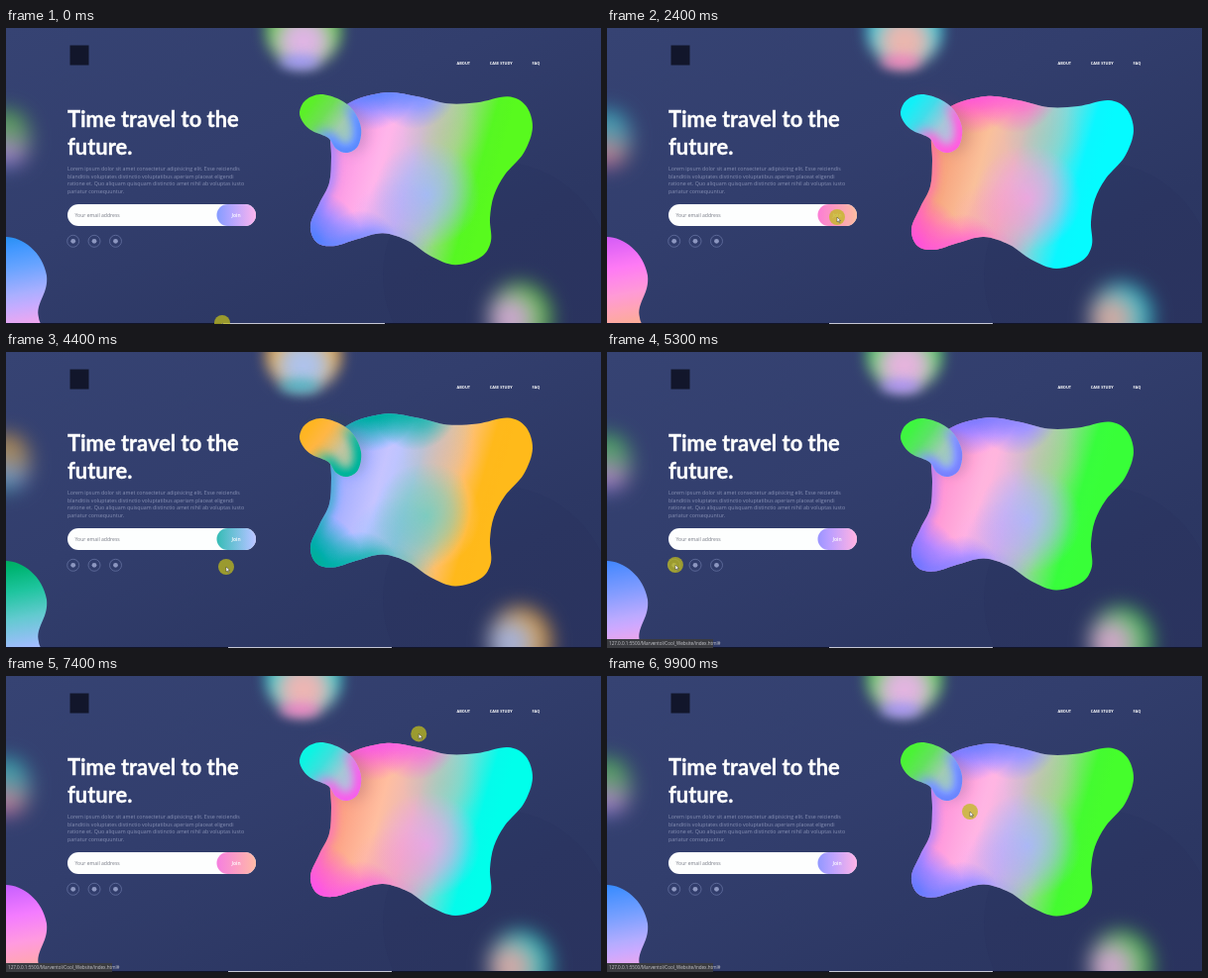
These frames come from a looping animation (600x299 px, 10 s). An HTML page with a canvas:

```html
<!DOCTYPE html>
<html lang="en">
<head>
<meta charset="utf-8">
<title>Time travel to the future</title>
<style>
  html, body { margin: 0; width: 100%; height: 100%; overflow: hidden; background: #303b69; }
  #stage { position: absolute; inset: 0; width: 600px; height: 299px; overflow: hidden;
    background: linear-gradient(155deg, #364373 0%, #323e6d 40%, #2c3763 75%, #2b355f 100%); }
  canvas, svg { position: absolute; left: 0; top: 0; }
  text { font-family: "Open Sans", "Noto Sans", sans-serif; }
  .title { font: 700 21.9px Lato, "Open Sans", sans-serif; fill: #fff; stroke: #fff; stroke-width: .35; }
  .copy { font-size: 5.3px; fill: #8790b4; }
  .nav { font-size: 3.9px; font-weight: 700; fill: #fff; }
  .ring { fill: none; stroke: #6470a0; stroke-width: .8; }
  .dot { fill: #8d97c0; }
</style>
</head>
<body>
<div id="stage">
  <svg width="600" height="299">
    <circle cx="495" cy="250" r="115" fill="#1a2350" opacity=".08"/>
    <path d="M62 189a11 11 0 0 1 11-11H241a11 11 0 0 1 0 22H73a11 11 0 0 1-11-11z" fill="#fdfefe"/>
  </svg>
  <canvas id="color" width="600" height="299"></canvas>
  <svg width="600" height="299">
    <rect x="64.5" y="17.5" width="19" height="20" fill="#12162b"/>
    <text class="nav" x="454.5" y="37.2">ABOUT</text>
    <text class="nav" id="study" x="487.7" y="37.2">CASE STUDY</text>
    <text class="nav" x="530.5" y="37.2">FAQ</text>
    <text class="title" x="62" y="99.5">Time travel to the</text>
    <text class="title" x="62" y="128">future.</text>
    <text class="copy" x="62" y="144">Lorem ipsum dolor sit amet consectetur adipisicing elit. Esse reiciendis</text>
    <text class="copy" x="62" y="151.5">blanditiis voluptates distinctio voluptatibus aperiam placeat eligendi</text>
    <text class="copy" x="62" y="159">ratione et. Quo aliquam quisquam distinctio amet nihil ab voluptas iusto</text>
    <text class="copy" x="62" y="166.5">pariatur consequuntur.</text>
    <text x="69.5" y="190.6" font-size="5.1" fill="#777b86">Your email address</text>
    <text x="232" y="190.6" font-size="5" font-weight="600" fill="#fff" text-anchor="middle">Join</text>
    <circle class="ring" cx="67.7" cy="215.3" r="6"/><circle class="dot" cx="67.7" cy="215.3" r="2.4"/>
    <circle class="ring" cx="89" cy="215.3" r="6"/><circle class="dot" cx="89" cy="215.3" r="2.4"/>
    <circle class="ring" cx="110.5" cy="215.3" r="6"/><circle class="dot" cx="110.5" cy="215.3" r="2.4"/>
    <rect y="298" width="600" height="1" fill="#12152a"/>
    <rect id="strip" y="298" width="165" height="1" fill="#c4c6d4"/>
    <g id="status">
      <rect y="290" width="107" height="9" fill="#3a3b40"/>
      <text x="2" y="296.4" font-size="4.6" fill="#c6c7cc">127.0.0.1:5500/Marventol/Cool_Website/index.html#</text>
    </g>
    <g id="cursor">
      <circle r="8" fill="#bfbb1c" fill-opacity=".75"/>
      <path d="M0 0v5l1.3-1.1.9 1.9.8-.4-.9-1.8h1.6z" fill="#fff" stroke="#222" stroke-width=".4"/>
    </g>
  </svg>
</div>
<script>
const LOOP = 10000;
const $ = id => document.getElementById(id);
const canvas = $('color'), c = canvas.getContext('2d');

// closed shapes, as x, y pairs
const BIG = [328,100, 345,76, 382,65, 415,69, 445,76, 475,75, 506,69, 524,78, 531,100, 522,126,
  503,148, 492,169, 488,192, 489,215, 479,231, 453,239, 428,230, 406,215, 380,207, 354,213,
  330,220, 313,216, 307,199, 316,177, 326,156, 328,130];
const SMALL = [296,85, 302,73, 317,67, 336,72, 350,83, 358,101, 355,119, 344,126, 333,122, 325,111, 309,104, 300,96];

function smooth(p) {
  const path = new Path2D(), n = p.length / 2;
  const at = i => [p[(i + n) % n * 2], p[(i + n) % n * 2 + 1]];
  path.moveTo(...at(0));
  for (let i = 0; i < n; i++) {
    const [a, b, d, e] = [at(i - 1), at(i), at(i + 1), at(i + 2)];
    path.bezierCurveTo(b[0] + (d[0] - a[0]) / 6, b[1] + (d[1] - a[1]) / 6,
      d[0] - (e[0] - b[0]) / 6, d[1] - (e[1] - b[1]) / 6, d[0], d[1]);
  }
  path.closePath();
  return path;
}
const big = smooth(BIG), small = smooth(SMALL);
const corner = new Path2D('M0 211C16 211 37 226 41 250C43 268 31 276 32.500 290Q33 295 35 299H0z');
const button = new Path2D('M223.500 178H241a11 11 0 0 1 0 22H223.500a11 11 0 0 1 0-22z');

const stops = (g, list) => (list.forEach(([k, col]) => g.addColorStop(k, col)), g);
const linear = (x0, y0, x1, y1, ...list) => stops(c.createLinearGradient(x0, y0, x1, y1), list);
const radial = (x, y, r, ...list) => stops(c.createRadialGradient(x, y, 0, x, y, r), list);

function glow(x, y, r, rgb, a) {
  c.fillStyle = radial(x, y, r, [0, `rgba(${rgb},${a})`], [.5, `rgba(${rgb},${a * .6})`], [1, `rgba(${rgb},0)`]);
  c.fillRect(x - r, y - r, 2 * r, 2 * r);
}

function haze(x, y, rx, ry, blur, alpha, fill) {
  c.save();
  c.filter = `blur(${blur}px)`;
  c.globalAlpha = alpha;
  c.fillStyle = fill;
  c.beginPath();
  c.ellipse(x, y, rx, ry, 0, 0, 7);
  c.fill();
  c.restore();
}

// soft line along the inside of the clipped shape
function rim(path, width, blur, style) {
  c.filter = `blur(${blur}px)`;
  c.lineWidth = width;
  c.strokeStyle = style;
  c.stroke(path);
}

function drawBig(dy) {
  c.save();
  c.translate(0, dy);
  c.fillStyle = linear(325, 130, 485, 176, [0, '#fb9478'], [.3, '#ffbea0'], [.5, '#e6b8bc'],
    [.72, '#7cdcd4'], [.9, '#04fbec'], [1, '#00ffec']);
  c.fill(big);
  c.clip(big);
  glow(440, 105, 40, '150,205,175', .4);
  glow(424, 168, 54, '245,160,235', .8);
  glow(392, 195, 46, '250,150,200', .5);
  glow(368, 57, 46, '250,80,238', 1);
  glow(412, 58, 44, '250,84,238', .85);
  glow(308, 216, 52, '255,78,238', 1);
  glow(358, 222, 38, '255,90,225', .8);
  rim(big, 10, 5, linear(330, 0, 440, 0, [0, 'rgba(250,80,240,.5)'], [1, 'rgba(250,80,240,0)']));
  c.restore();
}

function drawSmall() {
  c.save();
  c.shadowColor = 'rgba(90,60,110,.2)';
  c.shadowBlur = 14;
  c.shadowOffsetX = 7;
  c.fillStyle = linear(306, 78, 346, 108, [0, '#0cf4e4'], [.35, '#3ee0dc'], [.75, '#a4c8d6'], [1, '#b8bcde']);
  c.fill(small);
  c.shadowColor = 'transparent';
  c.clip(small);
  rim(small, 15, 4, linear(328, 84, 350, 108, [0, 'rgba(250,90,236,0)'], [.6, 'rgba(250,90,236,.8)'], [1, '#fa5aec']));
  c.restore();
}

function drawColor(dy) {
  c.clearRect(0, 0, 600, 299);
  haze(300, 4, 38, 36, 7, 1, radial(300, 14, 42, [0, '#f8b4b0'], [.45, '#dcb8b8'], [.8, '#58ccc8'], [1, '#20dcd4']));
  haze(296, 34, 20, 7, 6, .85, '#fa84cc');
  haze(0, 112, 24, 29, 10, .75, linear(10, 84, -2, 140, [0, '#20d0c8'], [.45, '#70b0b4'], [.75, '#f09c98'], [1, '#d070c8']));
  haze(518, 292, 31, 34, 10, .9, radial(508, 294, 44, [0, '#f8b4a8'], [.4, '#d0b8b4'], [.75, '#40d0c8'], [1, '#10d8d0']));
  c.fillStyle = linear(6, 211, 22, 299, [0, '#c860ff'], [.35, '#f47cff'], [.65, '#ff9ae0'], [1, '#ffaaa0']);
  c.fill(corner);
  c.fillStyle = linear(212, 0, 252, 0, [0, '#f57ee0'], [.5, '#fb9cc4'], [1, '#ffbaa6']);
  c.fill(button);
  drawBig(dy);
  drawSmall();
}

// the CSS "ease" curve
function ease(x) {
  let lo = 0, hi = 1, s = .5;
  for (let i = 0; i < 22; i++) {
    s = (lo + hi) / 2;
    if (.75 * s * (1 - s) + s ** 3 < x) lo = s; else hi = s;
  }
  return .3 * s * (1 - s) ** 2 + 3 * s * s * (1 - s) + s ** 3;
}
// eased there and back, starting at `from`
function swing(t, from, half) {
  const k = (((t - from) / half) % 2 + 2) % 2;
  return ease(k > 1 ? 2 - k : k);
}

// time, x, y of the pointer
const TRACK = [[0, 218, 298], [150, 218, 298], [1100, 305, 157], [2000, 236, 189], [2400, 232, 191],
  [3300, 230, 190], [4400, 222, 217], [5200, 68, 215], [6200, 100, 215], [6700, 110, 215],
  [7600, 460, 36], [8200, 490, 35], [8700, 515, 35], [9200, 534, 36], [9900, 366, 137], [10000, 366, 137]];

function pointer(t) {
  const i = TRACK.findIndex(k => k[0] > t);
  const [t0, x0, y0] = TRACK[i - 1], [t1, x1, y1] = TRACK[i];
  const u = (t - t0) / (t1 - t0), k = u * u * (3 - 2 * u);
  return [x0 + (x1 - x0) * k, y0 + (y1 - y0) * k];
}

function draw(t) {
  drawColor(-3 + 7 * swing(t, 550, 2000));
  canvas.style.filter = `hue-rotate(${360 * swing(t, 2560, 5000)}deg)`;
  const [x, y] = pointer(t);
  $('cursor').setAttribute('transform', `translate(${x} ${y})`);
  $('status').style.display = t > 5100 ? '' : 'none';
  $('study').style.fill = t > 8000 && t < 8800 ? '#8d96b8' : '';
  $('strip').setAttribute('x', t < 200 ? 217 : 224);
}

const start = performance.now();
function tick() {
  draw((performance.now() - start) % LOOP);
  requestAnimationFrame(tick);
}
tick();
</script>
</body>
</html>
```
